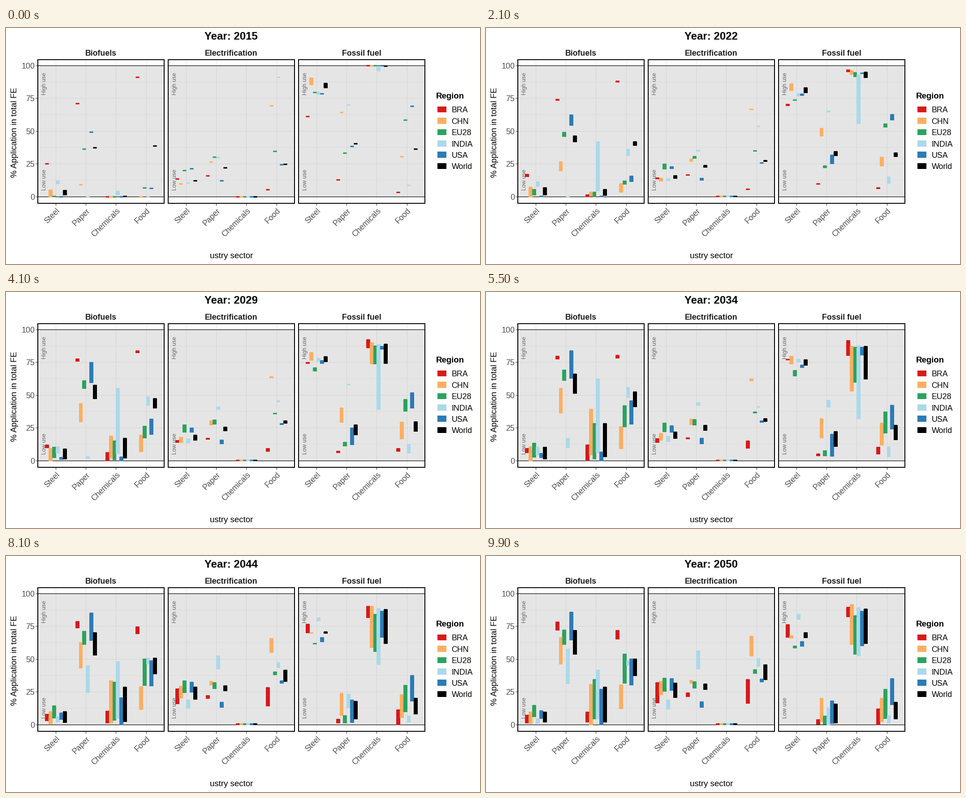
A matplotlib script for the animation above (10000 ms loop, 1058 by 529 pixels).

```python
import numpy as np
import matplotlib.pyplot as plt
from matplotlib.animation import FuncAnimation
from matplotlib.collections import LineCollection, PolyCollection
from matplotlib.patches import Rectangle

plt.rcParams["font.family"] = "Liberation Sans"

W, H, DPI = 1058, 529, 100
FRAMES, INTERVAL = 100, 100
PX = 72 / DPI

PANELS = ["Biofuels", "Electrification", "Fossil fuel"]
SECTORS = ["Steel", "Paper", "Chemicals", "Food"]
REGIONS = {"BRA": "#D7191C", "CHN": "#FDAE61", "EU28": "#2CA25F",
           "INDIA": "#ABD9E9", "USA": "#2C7BB6", "World": "#000000"}

LEFT = [71.2, 362.2, 653.2]
WIDTH, TOP, BOTTOM = 282.2, 70.8, 393.0
UNIT = WIDTH / 4.2
STEP = 0.7 * UNIT / 6

# Progress from 2015 to 2034, then from 2034 to 2050
T = np.arange(FRAMES)
TURN = 55
RISE = np.clip(T / TURN, 0, 1)
SETTLE = 1 - (1 - np.clip((T - TURN) / (FRAMES - 1 - TURN), 0, 1)) ** 1.3
RAMP = np.clip(T / 47, 0, 1)
RAMP = RAMP ** 2 * (3 - 2 * RAMP)

x_left, colors, ranges = [], [], []


def col_x(panel, col):
    return LEFT[panel] + (0.6 + col) * UNIT - 0.5


def val_y(v):
    return 378 - 2.941 * v


def path(start, turn, end, pace=1):
    """(high, low) in every frame; pace below 1 moves early, above 1 late."""
    start, turn, end = (np.ones(2) * p for p in (start, turn, end))
    return (start + np.outer(RISE ** pace, turn - start)
            + np.outer(SETTLE, end - turn))


def sector(col, bio, elec, other=0, joint=False):
    """Fossil fuel covers what biofuels, electricity and other sources leave."""
    bio = np.array([path(*row) for row in bio])
    elec = np.array([path(*row) for row in elec])
    rest = 100 - np.multiply.outer(np.ones(6) * other, RAMP)
    if joint:
        a = rest - bio[..., 0] - elec[..., 0]
        b = a + np.maximum(np.ptp(bio, axis=2), np.ptp(elec, axis=2))
    else:
        a = rest - bio[..., 0] - elec[..., 1]
        b = rest - bio[..., 1] - elec[..., 0]
    fossil = np.stack([np.maximum(a, b), np.minimum(a, b)], axis=2).clip(0)
    for panel, shares in enumerate((bio, elec, fossil)):
        x_left.extend(col_x(panel, col) + (np.arange(6) - 3) * STEP)
        colors.extend(REGIONS.values())
        ranges.extend(shares)


# Per region: 2015, then (high, low) in 2034 and 2050, then the pace
sector(0,
       bio=[(25, (9.1, 6.2), (7.1, 1.4), 0.7),
            ((5.1, 0), (10.7, 0), (9.5, 1)),
            (0.5, (13.3, 2.8), (14.5, 6)),
            ((11.8, 10), (10.2, 4.5), (4.3, 1.1)),
            (0, (5.5, 2.5), (10.4, 4.9), 3),
            ((4.6, 1.3), (10.2, 1.2), (9.5, 2))],
       elec=[(13.7, (16.7, 14), (31.8, 16.7), 2),
             (9.7, (20.6, 15.6), (33, 22.7)),
             (20, (28.4, 22), (35.4, 25.6), 0.6),
             (10.5, (18.4, 14.7), (18.7, 11.8)),
             (21.5, (26.6, 21.7), (35.1, 26.3), 1.5),
             (12.3, (21.8, 16.9), (31.6, 20.6))])
sector(1,
       bio=[(71, (79.6, 77.4), (78.3, 72)),
            (9.1, (55.1, 36.5), (66.2, 46.3)),
            (36.4, (69.1, 61.3), (72, 61.1)),
            (0, (17, 9.8), (57.5, 31.4), 6),
            (49.2, (83.6, 63), (85.8, 64.7)),
            (37.3, (66, 51.3), (71.8, 53.6), 1.2)],
       elec=[(16, (17.4, 16.5), (24.2, 21.5)),
             (26.6, (31.5, 27.5), (33.7, 31.5)),
             (30.2, (31.2, 27.3), (32.5, 27.8)),
             (30, (44.3, 42.2), (56, 42.5)),
             (12.3, (16.9, 13), (17.2, 13.3)),
             (22.1, (26.7, 23.2), (30.8, 26.8))])
sector(2,
       bio=[(0, (11.8, 0), (9.6, 2), 2.2),
            (0, (39, 4.5), (30.7, 0), 2.5),
            (0, (28.3, 1.2), (34.2, 4.4), 2.2),
            ((4.2, 1.3), (62.2, 6), (41.5, 4.4), 0.45),
            (0, (6.5, 0), (26.8, 0), 3),
            (0.4, (28.3, 3), (28.6, 1.9), 1.8)],
       elec=[(0, (0.5, 0), (0.6, 0))] * 6,
       other=[8, 8, 12, 6, 13, 9.5])
sector(3,
       bio=[(91.2, (80.1, 78.3), (71.8, 65.2), 1.3),
            (0, (25.9, 9.2), (30.1, 12.4)),
            (6.7, (41.9, 25.8), (53.6, 31.6), 2),
            (0, (55.6, 48.3), (48.5, 45.2), 0.45),
            (6.5, (45.6, 27.8), (50, 30.3), 1.5),
            (38.6, (52.2, 41.2), (49.9, 37.5), 1.5)],
       elec=[(5.3, (14.8, 9.6), (34.2, 16.4), 3),
             (69.5, (62.1, 61), (67.4, 52.2)),
             (34.8, (37, 36.3), (41.7, 39.1), 2),
             (91.1, (41.2, 40.8), (50.2, 44.6), 0.3),
             (24.4, (30.2, 29.3), (34.6, 32.5), 1.5),
             (24.9, (31.9, 29.8), (45.6, 34.5))],
       joint=True)

x_left = np.array(x_left)
x_right = x_left + STEP
y_range = val_y(np.array(ranges))

fig = plt.figure(figsize=(W / DPI, H / DPI), dpi=DPI, facecolor="white")
ax = fig.add_axes([0, 0, 1, 1])
ax.set_xlim(0, W)
ax.set_ylim(H, 0)
ax.axis("off")


def text(x, y, s, size, color="black", ha="center", **kw):
    return ax.text(x, y, s, fontsize=size * PX, color=color, ha=ha,
                   va="baseline", rotation_mode="anchor", **kw)


def line(xs, ys, color, width, z):
    ax.plot(xs, ys, color=color, lw=width * PX, zorder=z, solid_capstyle="butt")


def box(x, y, w, h, z, **kw):
    ax.add_patch(Rectangle((x, y), w, h, zorder=z, **kw))


for p, name in enumerate(PANELS):
    x0, x1 = LEFT[p], LEFT[p] + WIDTH
    for v in np.arange(0, 101, 12.5):
        line([x0, x1], [val_y(v)] * 2, "#EBEBEB", 0.9 if v % 25 == 0 else 0.45, 1)
    for c, label in enumerate(SECTORS):
        x = col_x(p, c)
        line([x, x], [TOP, BOTTOM], "#EBEBEB", 0.9, 1)
        line([x, x], [BOTTOM, BOTTOM + 5], "#333333", 1.1, 1)
        text(x + 10, 410.5, label, 17.7, "#4D4D4D", "right", rotation=45)
    box(x0, val_y(100), WIDTH, val_y(0) - val_y(100), 2, fc=(0, 0, 0, 0.1), ec="none")
    for v in (0, 100):
        line([x0, x1], [val_y(v)] * 2, "black", 1.2, 3)
    text(x0 + 18, 124.5, "High use", 12.7, "#666666", rotation=90, zorder=3)
    text(x0 + 18, 340, "Low use", 12.7, "#666666", rotation=90, zorder=3)
    box(x0, TOP, WIDTH, BOTTOM - TOP, 6, fc="none", ec="black", lw=2 * PX)
    text(x0 + WIDTH / 2 - 0.5, 62, name, 17.7, "#1A1A1A", weight="bold")

for v in range(0, 101, 25):
    line([LEFT[0] - 5, LEFT[0]], [val_y(v)] * 2, "#333333", 1.1, 1)
    text(64, val_y(v) + 6.8, str(v), 17.7, "#4D4D4D", "right")

text(502.8, 515.5, "ustry sector", 18.8)
text(24, 234.5, "% Application in total FE", 18.8, rotation=90)

text(960, 158, "Region", 18.7, ha="left", weight="bold")
for i, (name, color) in enumerate(REGIONS.items()):
    y = 182 + 25.4 * i
    box(963, y - 6.3, 19, 12.6, 2, fc=color, ec=color, lw=PX, joinstyle="round")
    text(994.5, y + 7.4, name, 17.7, ha="left")

title = text(502.5, 26.5, "", 24, weight="bold")
boxes = PolyCollection([], facecolors=colors, edgecolors=colors, linewidths=PX, zorder=4)
caps = LineCollection([], colors=colors, linewidths=3.2 * PX, capstyle="butt", zorder=5)
ax.add_collection(boxes, autolim=False)
ax.add_collection(caps, autolim=False)


def draw(i):
    hi, lo = y_range[:, i].T
    title.set_text(f"Year: {round(2015 + 35 * i / (FRAMES - 1))}")
    corners = [(x_left, hi), (x_right, hi), (x_right, lo), (x_left, lo)]
    quads = np.stack([np.column_stack(c) for c in corners], axis=1)
    boxes.set_verts(quads)
    caps.set_segments(quads[:, :2])
    return boxes, caps, title


anim = FuncAnimation(fig, draw, frames=FRAMES, interval=INTERVAL,
                     repeat=True, repeat_delay=0, blit=False)
plt.show()
```
